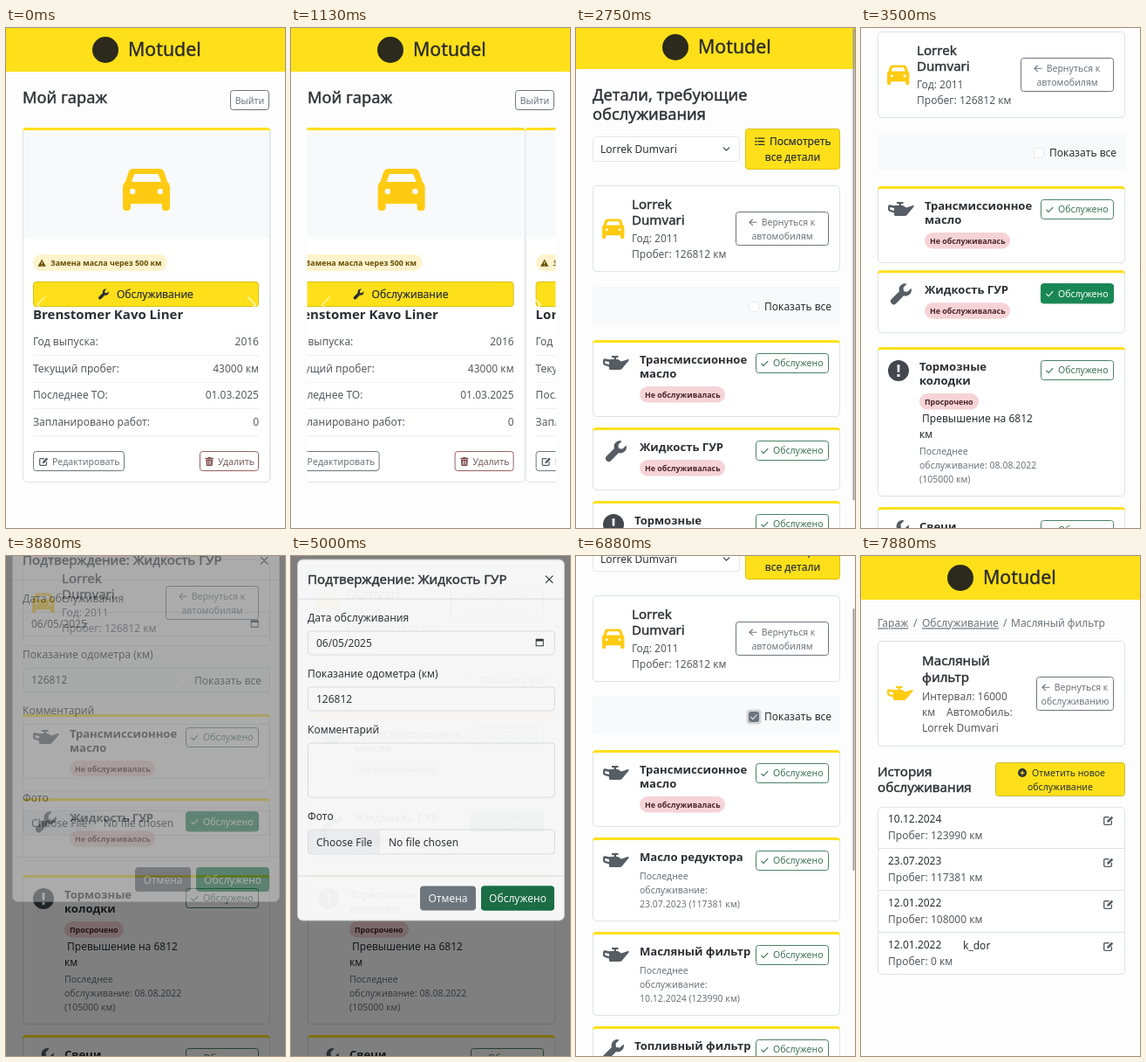
An HTML page for the animation above (8000 ms loop, 320 px wide and 572 px high).

```html
<!DOCTYPE html>
<html lang="ru">
<head>
<meta charset="utf-8">
<title>Гараж</title>
<style>
html, body { margin: 0; width: 100%; height: 100%; overflow: hidden; background: #fdfdfd; }
svg { display: block; width: 100vw; height: 100vh; }
text { font: 400 12px "Noto Sans", "Open Sans", sans-serif; fill: #2b3035; white-space: pre; }
/* medium weight: regular glyphs with a hairline outline */
.brand, .h2, .h5, .med { stroke: #2b3035; stroke-width: .4px; }
.med { stroke-width: .2px; }
.brand { font-size: 21.3px; fill: #2c2a1c; }
.h2 { font-size: 18.2px; }
.h5 { font-size: 15.1px; }
.name { font-size: 15px; font-weight: 600; }
.part { font-size: 13.1px; font-weight: 600; }
.badge { font-size: 8.85px; font-weight: 700; }
.warn { fill: #664d03; }
.late { fill: #4a2529; }
.lab { fill: #555b61; }
.sm { font-size: 10.5px; fill: #6c757d; }
.dark { fill: #2b3035; }
.green { fill: #3d7355; }
.red { fill: #775a58; }
.white { fill: #fff; }
.mut { fill: #6c757d; }
.link { fill: #6c757d; text-decoration: underline; }
</style>
</head>
<body>
<svg id="stage" viewBox="0 0 320 572"></svg>
<script>
const YELLOW = '#fee01a', EDGE = '#dcc010', GREY = '#6c757d', INK = '#2b3035', LINE = '#dee2e6';
const CAR = 'Lorrek Dumvari';

// name: [filled path, stroked path], in a 16 unit box unless noted
const ICONS = {
  car: ['M12 0H42Q46 0 47.5 4L51 15Q54 17 54 22V44Q54 48 50 48H48Q45 48 45 44V40H9V44Q9 48 5 48H4Q0 48 0 44V22Q0 17 3 15L6.5 4Q8 0 12 0ZM13 7L10 15H44L41 7Q40.6 6 39.5 6H14.5Q13.4 6 13 7ZM8 26a3.2 3.2 0 1 0 6.4 0a3.2 3.2 0 1 0-6.4 0ZM39.6 26a3.2 3.2 0 1 0 6.4 0a3.2 3.2 0 1 0-6.4 0Z'],
  oil: ['M10 0H17.5V2H15V4H17L21 6.5 28.5 4Q30.5 3.8 29.5 5.5L22 14.5Q20.8 16 19 16H8.5Q7 16 7 14.5V12.5L2 11Q0 10.2 0 8.5V5.5Q0 3 2.5 3.3L7 4.2Q7.6 4 8.5 4H12.5V2H10ZM2.3 6V8.7L7 10V7Z'],
  wrench: ['M15.7 3.6L12.9 6.3 10 6 9.7 3.1 12.4 .3A4.6 4.6 0 0 0 6.6 6L.7 11.9A2.4 2.4 0 0 0 4.1 15.3L10 9.4A4.6 4.6 0 0 0 15.7 3.6Z'],
  edit: ['M6 8L12.5 1.5 15 4 8.5 10.5 5.5 11Z', 'M8 3H2.5Q1 3 1 4.5V13Q1 14.5 2.5 14.5H11Q12.5 14.5 12.5 13V9'],
  trash: ['M1 2H5L6 .8H10L11 2H15V4H1ZM2 5H14L13.2 15Q13 16 12 16H4Q3 16 2.8 15ZM5 7H6V14H5ZM7.5 7H8.5V14H7.5ZM10 7H11V14H10Z'],
  check: ['', 'M2 8.5L6 12.5 14 4'],
  list: ['', 'M1 3H3M5.5 3H15M1 8H3M5.5 8H15M1 13H3M5.5 13H15'],
  back: ['', 'M15 8H1.5M7.5 2.5L1.5 8 7.5 13.5'],
  alert: ['M8 1L16 15H0ZM7.2 5.5H8.8V10.5H7.2ZM7.2 12H8.8V13.6H7.2Z'],
  stop: ['M0 8a8 8 0 1 0 16 0a8 8 0 1 0-16 0ZM7 3.5H9L8.8 9.2H7.2ZM7 10.6H9V12.6H7Z'],
  plus: ['M0 8a8 8 0 1 0 16 0a8 8 0 1 0-16 0ZM7 4H9V7H12V9H9V12H7V9H4V7H7Z'],
  down: ['', 'M2 5L8 11 14 5'],
  close: ['', 'M2 2L14 14M14 2L2 14'],
  date: ['M1 2H15V15H1ZM2.5 6V13.5H13.5V6Z']
};

const text = (x, y, s, cls = '', anchor = 'start') =>
  `<text x="${x}" y="${y}" class="${cls}" text-anchor="${anchor}">${s}</text>`;
const lines = (x, y, step, arr, cls, anchor) => arr.map((s, i) => text(x, y + i * step, s, cls, anchor)).join('');
const rect = (x, y, w, h, fill, stroke = 'none', r = 0) =>
  `<rect x="${x}" y="${y}" width="${w}" height="${h}" rx="${r}" fill="${fill}" stroke="${stroke}"/>`;
const box = (x, y, x2, y2, fill = 'none', stroke = GREY, r = 3) =>
  rect(x + .5, y + .5, x2 - x - 1, y2 - y - 1, fill, stroke, r);
const icon = (name, x, y, k, fill = INK) => {
  const [solid, open] = ICONS[name];
  return `<g transform="translate(${x} ${y}) scale(${k})">` +
    (solid ? `<path d="${solid}" fill="${fill}" fill-rule="evenodd"/>` : '') +
    (open ? `<path d="${open}" fill="none" stroke="${fill}" stroke-width="1.8" stroke-linecap="round"/>` : '') + '</g>';
};
const hline = (x, x2, y, c = '#eff1f3') => `<path d="M${x} ${y}H${x2}" stroke="${c}"/>`;
const group = (id, body, extra = '') => `<g id="${id}" ${extra}>${body}</g>`;
const card = (y, y2) => box(19, y, 303, y2, '#fff', LINE, 4.5);
const topCard = (y, y2) => card(y, y2) +
  `<path d="M19 ${y + 4}Q19 ${y} 23 ${y}H299Q303 ${y} 303 ${y + 4}Q302 ${y + 3} 299 ${y + 3}H23Q20 ${y + 3} 19 ${y + 4}Z" fill="${YELLOW}"/>`;

const header = rect(0, 0, 320, 50, YELLOW) + '<circle cx="114" cy="25" r="15" fill="#2c2a1c"/>' +
  text(140, 32.3, 'Motudel', 'brand');

function vehicle(name, values, dx) {
  const labels = ['Год выпуска:', 'Текущий пробег:', 'Последнее ТО:', 'Запланировано работ:'];
  const rows = labels.map((s, i) => {
    const y = 363.3 + i * 30.5;
    return text(31, y, s, 'lab') + text(290, y, values[i], 'lab', 'end') + hline(31, 290, Math.round(y + 11) + .5);
  }).join('');
  return `<g transform="translate(${dx} 0)">` + topCard(114, 520) +
    rect(20, 117, 282, 123, '#f8f9fa') + icon('car', 134, 161, 1, '#ffcb12') +
    rect(31, 259, 154, 19, '#fff3cd', 'none', 9.5) + icon('alert', 36.5, 264, .58, '#664d03') +
    text(51, 271.6, 'Замена масла через 500 км', 'badge warn') +
    box(31, 290, 290, 319, YELLOW, EDGE) + icon('wrench', 106, 298.5, .75) +
    text(127, 309, 'Обслуживание', 'med') + text(31, 333, name, 'name') + rows +
    box(31, 484, 136, 507) + icon('edit', 38, 490.5, .68, '#555b61') + text(53, 499.7, 'Редактировать', 'sm') +
    box(222, 484, 290, 507, 'none', '#96615f') + icon('trash', 228, 490.5, .66, '#7d4b49') +
    text(243, 499.7, 'Удалить', 'sm red') + '</g>';
}
const chevron = (x, d, o) =>
  `<path d="M${x - 4.5 * d} 307.5L${x + 4.5 * d} 316.5 ${x - 4.5 * d} 325.5" fill="none" stroke="#fff" stroke-width="1.6" opacity="${o}"/>`;

const garage = header + text(19, 85.5, 'Мой гараж', 'h2') + box(257, 71, 302, 94) +
  text(279.5, 86.5, 'Выйти', 'sm', 'middle') +
  '<clipPath id="clip"><rect x="18.5" y="113" width="285" height="408"/></clipPath><g clip-path="url(#clip)">' +
  group('slides', vehicle('Brenstomer Kavo Liner', ['2016', '43000 км', '01.03.2025', '0'], 0) +
    vehicle(CAR, ['2011', '126812 км', '01.03.2025', '4'], 284)) + '</g>' +
  chevron(40.3, -1, .55) + chevron(281.7, 1, .75) +
  group('press', rect(31, 290, 259, 29, '#8a7400', 'none', 3), 'opacity="0"');

const backTo = (x, y, x2, word) => {
  const m = (x + x2) / 2;
  return box(x, y, x2, y + 39) + icon('back', m - 38.5, y + 7.5, .6, GREY) +
    text(m + 7, y + 16, 'Вернуться к', 'sm', 'middle') + text(m, y + 32, word, 'sm', 'middle');
};
const done = (y, hot) => box(206, y + 15, 290, y + 38, hot ? '#198754' : 'none', hot ? '#198754' : '#4b8264') +
  icon('check', 211.5, y + 22, .6, hot ? '#fff' : '#35704f') +
  text(226, y + 30.3, 'Обслужено', hot ? 'sm white' : 'sm green');

// p: icon, title lines, height, badge, over (excess lines), note lines, id if the card reacts
function part(p, y) {
  const wide = p.icon == 'oil' || p.id, x = wide ? 73 : 67;
  const mark = p.icon == 'oil' ? icon('oil', 31, y + 18, 1, '#565d64') :
    icon(p.icon, wide ? 34 : 31, y + 15, 1.5, p.icon == 'stop' ? '#42484d' : '#565d64');
  let s = topCard(y, y + p.h) + mark + lines(x, y + 26.7, 15.8, p.title, 'part') + done(y);
  let b = y + 21 + p.title.length * 16;
  if (p.badge) {
    s += rect(x, b, p.badge == 'Просрочено' ? 68 : 98, 18.5, '#f5d3d6', 'none', 9.2) + text(x + 6, b + 12.5, p.badge, 'badge late');
    b += 24;
  }
  if (p.over) s += text(x + 3, y + 86.3, p.over[0]) + text(x, y + 104.3, p.over[1]);
  if (p.note) s += lines(x, p.over ? y + 123 : b + 11, 15.8, p.note, 'sm');
  return p.id ? group(p.id, s + group('hot', done(y, true))) : s;
}
function list(parts) {
  let y = 360;
  return parts.map(p => { const s = part(p, y); y += p.h + 12; return s; }).join('');
}
const served = (date, km) => ['Последнее', 'обслуживание:', `${date} (${km} км)`];
const gear = { icon: 'oil', title: ['Трансмиссионное', 'масло'], h: 88, badge: 'Не обслуживалась' };
const fluid = { icon: 'wrench', id: 'fluid', title: ['Жидкость ГУР'], h: 72, badge: 'Не обслуживалась' };
const pads = { icon: 'stop', title: ['Тормозные', 'колодки'], h: 171, badge: 'Просрочено', over: ['Превышение на 6812', 'км'],
  note: ['Последнее', 'обслуживание: 08.08.2022', '(105000 км)'] };
const plugs = { icon: 'wrench', title: ['Свечи'], h: 155, badge: 'Просрочено' };
const extra = [
  { icon: 'oil', title: ['Масло редуктора'], h: 96, note: served('23.07.2023', 117381) },
  { icon: 'oil', title: ['Масляный фильтр'], h: 96, note: served('10.12.2024', 123990) },
  { icon: 'wrench', title: ['Топливный фильтр'], h: 96, note: served('23.07.2023', 117381) }
];

const details = header + lines(19, 85.5, 22, ['Детали, требующие', 'обслуживания'], 'h2') +
  box(19, 127, 188, 156, '#fff', '#e4e7ea') + text(28, 146, CAR) + icon('down', 168, 137, .56) +
  box(194, 118, 303, 165, YELLOW, EDGE) + icon('list', 205, 127, .72) +
  text(222, 137.3, 'Посмотреть', 'med') + text(248.5, 155.3, 'все детали', 'med', 'middle') +
  card(183, 282) + icon('car', 30, 221.5, .47, '#ffcb12') + lines(64, 210, 18, CAR.split(' '), 'h5') +
  lines(64, 247.5, 18, ['Год: 2011', 'Пробег: 126812 км'], 'lab') + backTo(183, 213, 290, 'автомобилям') +
  rect(19, 299, 284, 43, '#f8f9fa') + box(198, 316, 210, 328, '#fff', '#e6e9ec') +
  group('tick', rect(195.5, 313.5, 17, 17, '#d3d6d9', 'none', 4) + rect(198, 316, 12, 12, GREY, 'none', 3) +
    icon('check', 199.5, 317.5, .56, '#fff')) +
  text(216, 326, 'Показать все') +
  group('before', list([gear, fluid, pads, plugs])) +
  group('after', list([gear, pads, plugs])) +
  group('all', list([gear, ...extra, pads]));

const field = (y, y2) => box(19, y, 303, y2, '#fff', LINE, 4);
const modal = box(7, -18, 314, 396, '#fff', '#c8c9ca', 6) +
  text(19, 10, 'Подтверждение: Жидкость ГУР', 'h5') + icon('close', 291, 0, .65) + hline(8, 313, 27.5, LINE) +
  text(19, 53, 'Дата обслуживания') + field(64, 92) + text(29, 82, '06/05/2025') + icon('date', 280, 72, .65) +
  text(19, 117, 'Показание одометра (км)') + field(128, 156) + text(29, 146.3, '126812') +
  text(19, 181, 'Комментарий') + field(192, 255) +
  text(19, 280.5, 'Фото') + field(291, 320) + rect(20, 292, 82, 27, '#f1f3f5') +
  text(29, 310, 'Choose File') + text(112, 310, 'No file chosen') + hline(8, 313, 344.5, LINE) +
  rect(148, 356, 64, 28, GREY, 'none', 4) + text(180, 374.5, 'Отмена', 'white', 'middle') +
  rect(218, 356, 84, 28, '#198754', 'none', 4) + group('send', rect(218, 356, 84, 28, '#146c43', 'none', 4)) +
  text(260, 374.5, 'Обслужено', 'white', 'middle');

const rows = [['10.12.2024', 123990], ['23.07.2023', 117381], ['12.01.2022', 108000], ['12.01.2022', 0]];
const history = header + text(19, 81.3, 'Гараж', 'link') + text(60, 81.3, '/', 'mut') +
  text(70, 81.3, 'Обслуживание', 'link') + text(163, 81.3, '/', 'mut') + text(172, 81.3, 'Масляный фильтр', 'mut') +
  card(97, 218) + icon('oil', 30, 149, 1, '#ffcb12') + lines(70, 125, 18.5, ['Масляный', 'фильтр'], 'h5') +
  lines(70, 165.3, 18, ['Интервал: 16000', 'км', CAR], 'lab') + text(98, 183.3, 'Автомобиль:', 'lab') +
  backTo(201, 138, 290, 'обслуживанию') +
  lines(19, 252, 18, ['История', 'обслуживания'], 'h5') +
  box(154, 236, 303, 275, YELLOW, '#c5bb3a') + icon('plus', 180, 243, .63) +
  text(196, 252, 'Отметить новое', 'sm dark') + text(228.5, 268, 'обслуживание', 'sm dark', 'middle') +
  card(287, 479) + rows.map(([d, km], i) => {
    const y = 287 + i * 48;
    return (i ? hline(19, 303, y - .5, LINE) : '') + text(31, y + 17.5, d) +
      text(31, y + 37, `Пробег: ${km} км`, 'lab') + icon('edit', 278, y + 9.5, .75, '#555b61');
  }).join('') + text(117, 450, 'k_dor');

document.getElementById('stage').innerHTML = rect(0, 0, 320, 572, '#fdfdfd') +
  group('garage', garage) + group('details', group('page', details) +
    '<rect id="bar" x="317.5" width="2" rx="1" fill="#9b9b9b"/>' +
    group('dim', rect(0, 0, 320, 572, '#000')) + group('modal', modal)) +
  group('history', history);

const el = id => document.getElementById(id);
const show = (id, on) => el(id).setAttribute('visibility', on ? 'inherit' : 'hidden');
const set = (id, k, v) => el(id).setAttribute(k, v);
const ramp = (t, from, len) => Math.min(1, Math.max(0, (t - from) / len));
const easeOut = u => 1 - (1 - u) ** 2;
const easeInOut = u => u < .5 ? 2 * u * u : 1 - 2 * (1 - u) ** 2;
function along(t, keys) {
  let v = keys[0][1];
  for (let i = 1; i < keys.length; i++)
    v += (keys[i][1] - keys[i - 1][1]) * ramp(t, keys[i - 1][0], keys[i][0] - keys[i - 1][0]);
  return v;
}
const SCROLL = [[2625, 0], [2750, 3], [2875, 110], [3000, 179], [5125, 179], [5500, 115],
  [6750, 115], [6875, 138], [7000, 178], [7125, 203], [7250, 215]];

function draw(ms) {
  const t = Math.floor((ms + 5) / 125) * 125 % 8000;
  show('garage', t < 2250);
  show('details', t >= 2250 && t < 7750);
  show('history', t >= 7750);
  set('slides', 'transform', `translate(${-284 * easeInOut(ramp(t, 970, 630))} 0)`);
  set('press', 'opacity', t >= 2125 ? .15 : 0);

  const y = along(t, SCROLL);
  set('page', 'transform', `translate(0 ${-y})`);
  show('before', t < 5250);
  show('after', t >= 5250 && t < 6500);
  show('all', t >= 6500);
  show('tick', t >= 6375);
  const hover = ramp(t, 3300, 150);
  set('hot', 'opacity', hover);
  set('fluid', 'transform', `translate(0 ${-3.75 * hover})`);

  const late = t >= 6875;
  show('bar', t >= 2750 && t < 3375 || late && t < 7625);
  set('bar', 'y', late ? 60 + (y - 138) * .45 : y * .18);
  set('bar', 'height', late ? 300 : 540);

  set('dim', 'opacity', .5 * (ramp(t, 3680, 140) - ramp(t, 5140, 150)));
  set('modal', 'opacity', ramp(t, 3823, 150) - ramp(t, 4990, 150));
  const open = easeOut(ramp(t, 3815, 300)) - easeOut(ramp(t, 4990, 300));
  set('modal', 'transform', `translate(0 ${24 - 37.5 * (1 - open)})`);
  set('send', 'opacity', t >= 4875 ? 1 : 0);
}

const start = performance.now();
function tick() {
  draw((performance.now() - start) % 8000);
  requestAnimationFrame(tick);
}
draw(0);
requestAnimationFrame(tick);
</script>
</body>
</html>
```
